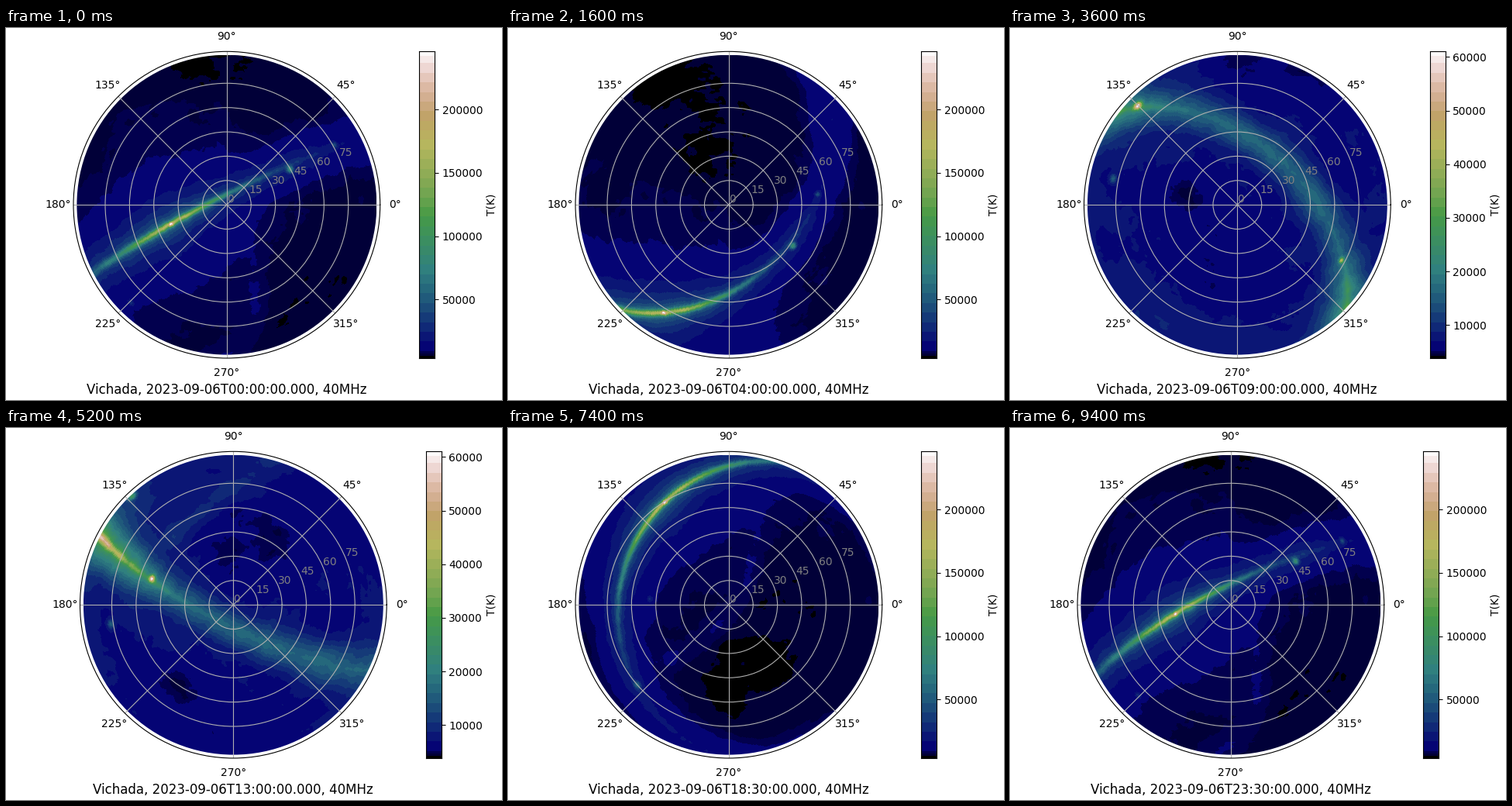
Recreate the animation shown at these times as a matplotlib script. Size 640x480 px, loop 9600 ms.

```python
import numpy as np
import matplotlib.pyplot as plt
from matplotlib.animation import FuncAnimation
from matplotlib.colors import ListedColormap
from matplotlib.patches import Circle

W, H = 640, 480
FRAMES, INTERVAL = 48, 200
LAT = np.radians(5.3)
LST0 = 279.0             # sidereal angle at midnight, degrees
LST_STEP = 7.5205        # degrees per half hour
SIZE = 395.7             # side of the polar axes, pixels
R_DATA, R_AXIS = 92.5, 94.6
T_MIN = 3850
CELLS = 2                # sky map cells per degree

# Compact sources: ra, dec, peak temperature in K, width in degrees
SOURCES = [(266.4, -28.7, 246700, 0.9), (307, 42.8, 92000, 1.3),
           (350.5, 60, 46000, 0.9), (134.6, -44.3, 61163, 1.3),
           (89.7, -69.3, 15000, 1.4), (202, -43, 27000, 1.3)]

# Centres of the cold patches: ra, dec
COLD = [(144, 2), (150, 30), (63, -29)]


def unit(ra, dec):
    ra, dec = np.radians(ra), np.radians(dec)
    return np.array([np.cos(dec) * np.cos(ra), np.cos(dec) * np.sin(ra),
                     np.sin(dec) + 0 * ra])


def galactic(ra, dec):
    d, a, pole = np.radians(dec), np.radians(ra - 192.86), np.radians(27.13)
    b = np.arcsin(np.sin(d) * np.sin(pole)
                  + np.cos(d) * np.cos(pole) * np.cos(a))
    turn = np.arctan2(np.cos(d) * np.sin(a),
                      np.sin(d) * np.cos(pole)
                      - np.cos(d) * np.sin(pole) * np.cos(a))
    lon = 122.93 - np.degrees(turn)
    return (lon + 180) % 360 - 180, np.degrees(b)


def separation(vec, ra, dec):
    dot = np.tensordot(unit(ra, dec), vec, 1)
    return np.degrees(np.arccos(np.clip(dot, -1, 1)))


def bump(x, width):
    return np.exp(-0.5 * (x / width) ** 2)


def wave_noise(vec, rng, low, high, count):
    """Isotropic noise on the sphere from random plane waves."""
    total, power = np.zeros(vec.shape[1:]), 0
    for k in np.geomspace(low, high, count):
        d = rng.normal(size=3)
        d *= k / np.linalg.norm(d)
        amp = k ** -0.6
        total += amp * np.cos(np.tensordot(d, vec, 1)
                              + rng.uniform(0, 2 * np.pi))
        power += amp ** 2 / 2
    return total / np.sqrt(power)


def plane(lon, b):
    """Glow of the galactic plane: a sharp ridge that widens away from l=0."""
    ridge = (8000 + 35000 * np.exp(-(lon / 90) ** 4)
             + 115000 * np.exp(-(lon / 33) ** 2))
    ab = np.abs(b)
    sharp = (0.6 * bump(b, 1.15) + 0.26 * np.exp(-ab / 4)
             + 0.14 * np.exp(-ab / 11))
    mix = 0.5 + 0.5 * np.cos(np.radians(lon))
    return ridge * (mix * sharp + (1 - mix) * bump(b, 7))


def build_sky():
    ra, dec = np.meshgrid((np.arange(360 * CELLS) + 0.5) / CELLS,
                          (np.arange(180 * CELLS) + 0.5) / CELLS - 90)
    vec = unit(ra, dec)
    lon, b = galactic(ra, dec)
    rng = np.random.default_rng(40)
    rough = wave_noise(vec, rng, 6, 180, 55)
    fine = wave_noise(vec, rng, 30, 200, 30)

    sky = 6000 + 2400 * np.exp(-np.abs(b) / 20)
    sky += 5500 * np.exp(-(separation(vec, 266.4, -28.9) / 50) ** 2)
    for spot in COLD:
        sky -= 1400 * bump(separation(vec, *spot), 11)

    # Large radio loop north of the plane
    loop = separation(vec, 233, -38) - 58
    sky += 2600 * bump(loop, 5) * np.clip(b / 25, 0, 1)
    sky *= 1 + 0.06 * rough
    sky += plane(lon, b) * (1 + 0.05 * fine)

    for a, d, peak, width in SOURCES:
        local = sky[int((d + 90) * CELLS), int(a * CELLS)]
        sky += (peak - local) * bump(separation(vec, a, d), width)
    return np.maximum(sky, T_MIN)


def view_grid(size=387):
    """Hour angle in degrees and map row for each pixel of the disc."""
    axis = (np.arange(size) + 0.5) / size * 2 * R_DATA - R_DATA
    x, y = np.meshgrid(axis, axis)
    z, az = np.radians(np.hypot(x, y)), np.arctan2(y, x)
    sin_dec = (np.sin(LAT) * np.cos(z)
               + np.cos(LAT) * np.sin(z) * np.cos(az))
    ha = np.arctan2(-np.sin(z) * np.sin(az),
                    np.cos(z) * np.cos(LAT)
                    - np.sin(z) * np.cos(az) * np.sin(LAT))
    dec = np.degrees(np.arcsin(np.clip(sin_dec, -1, 1)))
    row = np.clip(((dec + 90) * CELLS).astype(int), 0, 180 * CELLS - 1)
    return np.degrees(ha), row


def stepped_cmap():
    """Earth colours in flat steps, finer at the dark end."""
    edges = np.r_[0, 2, 4, np.arange(6, 252, 8), 252, 256]
    mids = (edges[:-1] + edges[1:] - 1) / 2 / 255
    mids[0], mids[-1] = 0, 1
    colors = plt.get_cmap("gist_earth")(mids)
    return ListedColormap(np.repeat(colors, np.diff(edges), axis=0))


def hottest(lst):
    """Highest temperature above the horizon."""
    dec = np.radians((np.arange(180 * CELLS) + 0.5) / CELLS - 90)[:, None]
    ra = (np.arange(360 * CELLS) + 0.5) / CELLS
    sin_alt = (np.sin(LAT) * np.sin(dec)
               + np.cos(LAT) * np.cos(dec) * np.cos(np.radians(lst - ra)))
    return SKY[sin_alt > 0].max()


def box(x, width):
    return [x / W, 54 / H, width / W, SIZE / H]


plt.rcParams["font.family"] = "DejaVu Sans"
SKY = build_sky()
HOUR, ROW = view_grid()
CMAP = stepped_cmap()

fig = plt.figure(figsize=(W / 100, H / 100), dpi=100, facecolor="white")

disc = fig.add_axes(box(87, SIZE))
disc.axis("off")
image = disc.imshow(np.zeros(HOUR.shape), cmap=CMAP, origin="lower",
                    extent=(-R_DATA, R_DATA, -R_DATA, R_DATA),
                    interpolation="nearest", aspect="auto")
disc.set(xlim=(-R_AXIS, R_AXIS), ylim=(-R_AXIS, R_AXIS))
image.set_clip_path(Circle((0, 0), R_DATA, transform=disc.transData))

polar = fig.add_axes(box(87, SIZE), projection="polar", facecolor="none")
polar.set_ylim(0, R_AXIS)
polar.set_yticks(range(0, 90, 15))
polar.tick_params(axis="y", labelcolor="gray")
polar.grid(True, color="#b0b0b0", lw=0.8)

bar = fig.add_axes(box(533, 20))
ramp = bar.imshow(np.arange(256)[:, None], cmap=CMAP, origin="lower",
                  aspect="auto", interpolation="nearest",
                  extent=(0, 1, T_MIN, SKY.max()))
bar.set_xticks([])
bar.yaxis.tick_right()
fig.text(627 / W, (54 + SIZE / 2) / H, "T(K)", rotation=90, ha="center",
         va="center", fontsize=10)
title = fig.text(0.5, 8 / H, "", ha="center", va="baseline", fontsize=12)


def update(i):
    lst = LST0 + LST_STEP * i
    col = ((lst - HOUR) % 360 * CELLS).astype(int) % (360 * CELLS)
    top = hottest(lst)
    image.set_data(SKY[ROW, col])
    image.set_clim(T_MIN, top)
    ramp.set_extent((0, 1, T_MIN, top))
    bar.set_ylim(T_MIN, top)

    # Shorter tick labels leave room to move right
    shift = 0 if top >= 100000 else 8.5
    disc.set_position(box(87 + shift, SIZE))
    polar.set_position(box(87 + shift, SIZE))
    bar.set_position(box(533 + shift, 20))
    title.set_x((284.5 + shift) / W)
    title.set_text(f"Vichada, 2023-09-06T{i // 2:02d}:{i % 2 * 30:02d}:00.000,"
                   " 40MHz")
    return image, ramp, title


anim = FuncAnimation(fig, update, frames=FRAMES, interval=INTERVAL,
                     repeat=True, blit=False)
plt.show()
```
